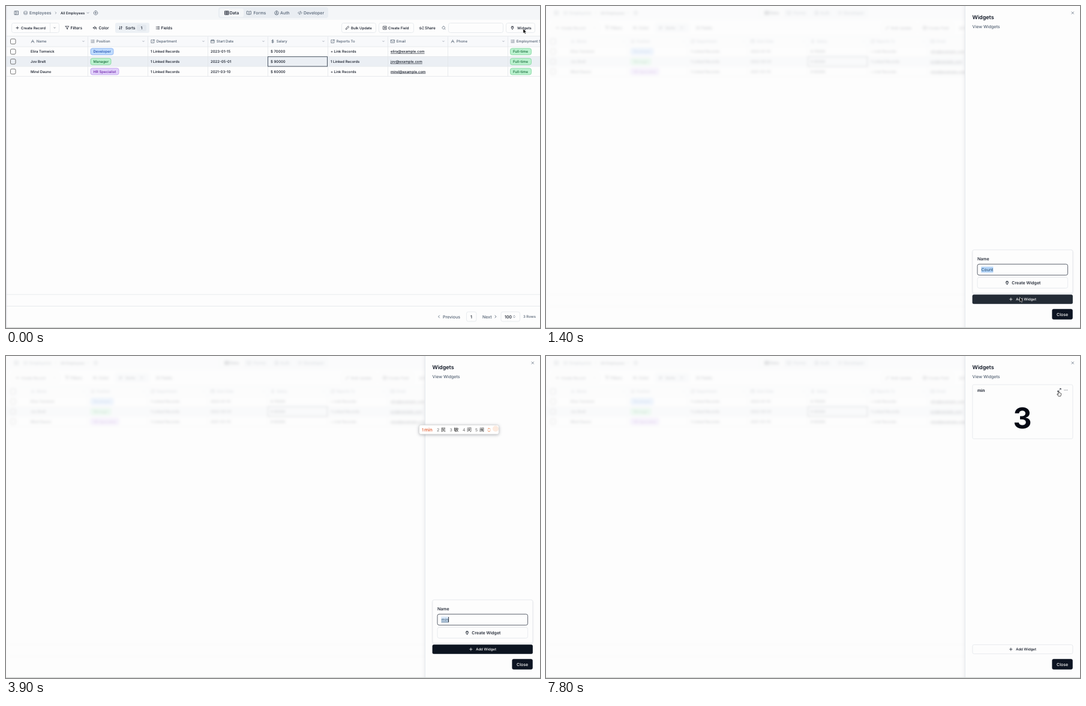
Recreate the animation shown at these times as an HTML page. Size 890 px wide and 538 px high, loop 8000 ms.

```html
<!DOCTYPE html>
<html lang="en">
<head>
<meta charset="utf-8">
<title>Widgets panel</title>
<style>
  html, body { margin: 0; width: 100%; height: 100%; overflow: hidden; background: #fdfdfd; }
  #stage { position: relative; width: 890px; height: 538px; overflow: hidden; }
  svg, #veil { position: absolute; left: 0; top: 0; width: 890px; height: 538px; }
  #veil { background: rgba(253, 253, 253, .8); backdrop-filter: blur(2px); }
  text { font-family: Inter, "Noto Sans CJK SC", "Noto Sans CJK", sans-serif; text-rendering: geometricPrecision; white-space: pre; }
  .icon { fill: none; stroke-linecap: round; stroke-linejoin: round; }
</style>
</head>
<body>
<div id="stage">
  <svg id="page" viewBox="0 0 890 538"></svg>
  <div id="veil"></div>
  <svg id="front" viewBox="0 0 890 538"></svg>
</div>
<script>
const LOOP = 8000, STEP = 100;
const INK = '#0d1422', SLATE = '#526072', LINE = '#e3e6ea', PAPER = '#fdfdfd';
const $ = id => document.getElementById(id);

function add(parent, tag, attrs = {}, content) {
  const el = document.createElementNS('http://www.w3.org/2000/svg', tag);
  for (const key in attrs) el.setAttribute(key, attrs[key]);
  if (content !== undefined) el.textContent = content;
  return parent.appendChild(el);
}
const group = (parent, attrs) => add(parent, 'g', attrs);
const box = (parent, x, y, width, height, fill, stroke = 'none', rx = 0, extra = {}) =>
  add(parent, 'rect', { x, y, width, height, fill, stroke, rx, 'stroke-width': .8, ...extra });
// y is the vertical centre of the text
const label = (parent, x, y, str, size = 6, fill = INK, weight = 500, extra = {}) =>
  add(parent, 'text', { x, y: y + size * .36, 'font-size': size, fill, 'font-weight': weight, ...extra }, str);
const line = (parent, x1, y1, x2, y2, stroke = LINE, w = .8) =>
  add(parent, 'line', { x1, y1, x2, y2, stroke, 'stroke-width': w });

// icon outlines in a 24 unit box
const ICONS = {
  plus: 'M5 12h14M12 5v14',
  down: 'M6 9l6 6 6-6',
  left: 'M15 18l-6-6 6-6',
  right: 'M9 18l6-6-6-6',
  updown: 'M7 15l5 5 5-5M7 9l5-5 5 5',
  close: 'M18 6L6 18M6 6l12 12',
  sidebar: 'M3 3h18v18H3zM9 3v18M16 9l-3 3 3 3',
  base: 'M3 5c0-3 18-3 18 0v14c0 3-18 3-18 0zM3 12c0 3 18 3 18 0',
  circlePlus: 'M12 2a10 10 0 1 0 .1 0M8 12h8M12 8v8',
  table: 'M3 3h18v18H3zM3 9h18M3 15h18M12 3v18',
  book: 'M2 4h7l3 3 3-3h7v15h-8l-2 2-2-2H2zM12 7v13',
  shield: 'M12 2a10 10 0 1 0 .1 0M12 7a3 3 0 1 0 .1 0M6 19c2-5 10-5 12 0',
  code: 'M17 17l5-5-5-5M7 7l-5 5 5 5M14 4l-4 16',
  filter: 'M2 3h20l-8 9v8l-4-2v-6z',
  paint: 'M4 11l8-8 8 8-8 8zM2 12h18M21 16v4',
  sort: 'M3 16l4 4 4-4M7 20V4M21 8l-4-4-4 4M17 4v16',
  list: 'M9 5h12M9 12h12M9 19h12M3 5h1M3 12h1M3 19h1',
  pen: 'M17 3l4 4L8 20l-5 1 1-5z',
  field: 'M3 3h18v18H3zM8 12h8M12 8v8',
  share: 'M9 12a5 5 0 1 0-1 4M2 21c0-7 14-7 14 0M17 4a4 4 0 0 1 0 8M19 15c2 1 3 3 3 6',
  search: 'M11 3a8 8 0 1 0 .1 0M21 21l-4-4',
  plug: 'M12 22v-5M9 8V2M15 8V2M18 8v5a4 4 0 0 1-4 4h-4a4 4 0 0 1-4-4V8z',
  letter: 'M4 20L12 4l8 16M7 14h10',
  select: 'M11 5h10M11 12h10M3 19h18M3 5h4M3 12h4',
  link: 'M14 3h7v7M21 3l-11 11M10 4H3v17h17v-7',
  date: 'M3 5h18v16H3zM3 10h18M8 2v5M16 2v5',
  money: 'M12 2v20M17 6H9a3 3 0 0 0 0 6h6a3 3 0 0 1 0 6H6',
  mail: 'M2 4h20v16H2zM2 7l10 7 10-7',
  expand: 'M15 3h6v6M9 21H3v-6M21 3l-7 7M3 21l7-7',
  dots: 'M4 12h1M12 12h1M20 12h1'
};
const icon = (parent, name, cx, cy, size = 7, stroke = INK) => add(parent, 'path', {
  d: ICONS[name], class: 'icon', stroke, 'stroke-width': 2.4,
  transform: `translate(${cx - size / 2} ${cy - size / 2}) scale(${size / 24})`
});

function drawPage(g) {
  box(g, 0, 0, 890, 538, PAPER);
  box(g, 0, 0, 890, 23, '#f4f6f8');
  icon(g, 'sidebar', 17.5, 11.5, 8, SLATE);
  icon(g, 'base', 32.5, 11.5, 7, SLATE);
  label(g, 39, 11.5, 'Employees', 7, SLATE);
  icon(g, 'right', 83, 11.5, 6, SLATE);
  label(g, 91, 11.5, 'All Employees');
  icon(g, 'down', 136.5, 11.5, 6, SLATE);
  icon(g, 'circlePlus', 149.5, 11.5, 8, SLATE);

  box(g, 354, 2, 183, 18, '#e9edf2', 'none', 4);
  box(g, 356, 4, 40, 14.5, '#f4f6f8', 'none', 3);
  [['table', 368, 'Data', 372.8, INK], ['book', 405, 'Forms', 412.5, SLATE],
   ['shield', 451, 'Auth', 457, SLATE], ['code', 490, 'Developer', 496, SLATE]]
    .forEach(([ic, ix, str, x, c]) => { icon(g, ic, ix, 11.5, 8, c); label(g, x, 11.5, str, 7, c); });

  box(g, 9.5, 28.5, 79, 16, PAPER, LINE, 3);
  line(g, 73.5, 28.5, 73.5, 44.5);
  icon(g, 'down', 81, 36.5, 5);
  box(g, 182, 28, 57, 17, '#edf1f5', 'none', 3);
  box(g, 218, 31, 16, 11, '#e4e9ef', 'none', 3);
  for (const [x, w] of [[559.5, 57], [621.5, 58], [737.5, 91], [833.5, 48]])
    box(g, x, 28.5, w, 16, PAPER, LINE, 3);
  [['plus', 19, 'Create Record', 25, 6], ['filter', 102, 'Filters', 107.5, 6.6], ['paint', 148, 'Color', 154.5, 6.6],
   ['sort', 191, 'Sorts', 199, 6.6], ['list', 253, 'Fields', 258.5, 6.6], ['pen', 569, 'Bulk Update', 575, 6],
   ['field', 631.5, 'Create Field', 637, 6], ['share', 693, 'Share', 698, 6.4], ['plug', 844, 'Widgets', 852, 6]]
    .forEach(([ic, ix, str, x, size]) => { icon(g, ic, ix, 36.5, 7); label(g, x, 36.5, str, size); });
  label(g, 224.5, 36.5, '1', 6.5);
  icon(g, 'search', 729.5, 36.5, 7, SLATE);

  box(g, 0, 50, 890, 18, '#f8f9fb');
  box(g, 0, 84.5, 890, 16.5, '#ebeff4');
  for (const y of [50.3, 68, 84.5, 101, 117.5, 482, 501.5]) line(g, 0, y, 890, y);
  const heads = [['letter', 'Name'], ['select', 'Position'], ['link', 'Department'], ['date', 'Start Date'], ['money', 'Salary'],
    ['link', 'Reports To'], ['mail', 'Email'], ['letter', 'Phone'], ['select', 'Employment Status']];
  heads.forEach(([ic, str], i) => {
    const x = 36 + i * 100;
    if (i) line(g, x + .5, 51, x + .5, 117.5);
    icon(g, ic, x + 8.5, 59, 7, SLATE);
    label(g, x + 14.7, 59, str, 6, SLATE);
    icon(g, 'down', x + 93, 59, 5, SLATE);
  });

  const BLUE = ['#bfdbfe', '#86aef0', '#1e4fae'], GREEN = ['#bbf2cf', '#7fd39c', '#17693a'], VIOLET = ['#e2d2fb', '#bd97ee', '#6b21a8'];
  const pill = (x, y, w, str, [fill, edge, ink]) => {
    box(g, x, y - 5.4, w, 10.8, fill, edge, 3);
    label(g, x + 4.5, y, str, 6, ink);
  };
  const rows = [
    ['Elira Tomwick', 'Developer', 38, BLUE, '2023-01-15', '$ 70000', '+ Link Records', 'elira@example.com'],
    ['Jov Brelt', 'Manager', 34, GREEN, '2022-05-01', '$ 90000', '1 Linked Records', 'jov@example.com'],
    ['Mirel Dauno', 'HR Specialist', 47, VIOLET, '2021-03-10', '$ 60000', '+ Link Records', 'mirel@example.com']
  ];
  box(g, 7.5, 55, 8.5, 8.5, PAPER, '#555', 2);
  rows.forEach(([name, role, w, tint, start, pay, boss, mail], i) => {
    const y = 76.2 + i * 16.6;
    box(g, 7.5, y - 4.2, 8.5, 8.5, 'none', '#555', 2);
    label(g, 41, y, name);
    pill(141, y, w, role, tint);
    label(g, 241, y, '1 Linked Records');
    label(g, 341, y, start);
    label(g, 441, y, pay);
    label(g, 541, y, boss);
    label(g, 641, y, mail, 6, INK, 500, { 'text-decoration': 'underline' });
    pill(840.5, y, 35, 'Full-time', GREEN);
  });
  box(g, 436.5, 84.7, 99, 16.2, 'none', '#4b5563', 0, { 'stroke-width': 1 });

  icon(g, 'left', 721.5, 519, 8, SLATE);
  label(g, 728, 519, 'Previous', 7, SLATE);
  box(g, 767.5, 511, 16.5, 16, PAPER, LINE, 3);
  label(g, 774, 519, '1', 7);
  label(g, 794, 519, 'Next', 7, SLATE);
  icon(g, 'right', 816, 519, 8, SLATE);
  box(g, 825, 511, 31.5, 16, PAPER, LINE, 3);
  label(g, 831, 519, '100', 7);
  icon(g, 'updown', 847, 519, 6, SLATE);
  label(g, 862, 519, '3 Rows', 6, SLATE);
  line(g, .8, 0, .8, 538, '#d5d8dd', 1);
}

const shade = (y, blur, a) => ({ style: `filter:drop-shadow(0 ${y}px ${blur}px rgba(15,23,42,${a}))` });
const front = $('front');
drawPage($('page'));

const panel = group(front);
box(panel, 698.5, -2, 194, 542, PAPER, '#e2e6eb', 0, shade(1, 3, .1));
label(panel, 710.5, 18.5, 'Widgets', 9, INK, 600);
label(panel, 710.5, 34.5, 'View Widgets', 7, SLATE);
icon(panel, 'close', 877.8, 11.5, 7, '#475569');
box(panel, 843.4, 506.3, 34.4, 17.4, INK, 'none', 3);
label(panel, 851, 515, 'Close', 7, '#fff');

box(panel, 710.9, 482.4, 167, 15.2, PAPER, LINE, 2.5);
const addDark = box(panel, 710.6, 482.3, 167.3, 15.4, '#0c1420', 'none', 2.5);
const addIcon = icon(panel, 'plus', 774.8, 490, 7.5);
const addText = label(panel, 783.2, 490, 'Add Widget');

const form = group(panel);
box(form, 710.9, 407.4, 167, 72.6, PAPER, LINE, 3, shade(1, 1.2, .1));
label(form, 719, 422, 'Name', 7);
box(form, 719, 431.3, 150.6, 18.4, PAPER, '#343c49', 3);
box(form, 719, 453.4, 150.6, 18, PAPER, LINE, 3);
icon(form, 'plug', 768.5, 462.5, 7.5);
label(form, 776.3, 462.5, 'Create Widget', 7);
const mark = box(form, 725.3, 435.6, 20, 9.8, '#b3d4f8');
const typed = label(form, 725.5, 440.5, '', 7, INK, 400);
const caret = box(form, 737, 436, .9, 9, INK);

const card = group(panel);
const frame = box(card, 710.9, 47.9, 167, 74.5, PAPER, LINE, 2);
label(card, 719, 57, 'min', 7, INK, 600);
const skeleton = group(card, { fill: '#dbe1ea' });
add(skeleton, 'circle', { cx: 782, cy: 94, r: 16 });
box(skeleton, 806.5, 80, 15.8, 8, '#dbe1ea', 'none', 2);
box(skeleton, 806.5, 100, 7.8, 8, '#dbe1ea', 'none', 2);
const total = add(card, 'text', { x: 794, y: 120.9, 'font-size': 48, 'font-weight': 700, 'text-anchor': 'middle', fill: '#050914' }, '3');
const tools = group(card);
icon(tools, 'expand', 855.5, 57, 7);
icon(tools, 'dots', 866.3, 57, 7);

line(front, 0, 537.3, 890, 537.3, '#cfd3d1', 1.3);

const ime = group(front);
box(ime, 688.5, 115.3, 133, 15.4, '#fff', '#d9d9d9', 3, shade(1, 2.5, .3));
label(ime, 693, 123, '1', 7, '#e2592b', 500);
const candidates = [697, 725, 746.5, 768, 789].map((x, i) => {
  if (i) label(ime, x - 7, 123, String(i + 1), 7, '#666', 400);
  return label(ime, x, 123, '', 8, i ? '#222' : '#e2592b');
});
icon(ime, 'updown', 805, 123.5, 9, '#e8702f');
add(ime, 'circle', { cx: 816, cy: 121.5, r: 5, fill: '#fdebdf' });

const arrow = add(front, 'path', {
  d: 'M0 0V7.6L1.8 6.1 3 8.7 4.3 8.1 3.1 5.6H5.4Z', fill: '#000', stroke: '#fff', 'stroke-width': .5
});
const hand = add(front, 'path', {
  d: 'M3 0.8Q4 .1 4.5 1V3.8Q5.3 3.3 5.9 4Q6.8 3.7 7.2 4.5Q8.3 4.3 8.4 5.4V7.5L7.4 10.4H3.2L.6 6.8Q.6 5.7 1.7 6L3 7Z',
  fill: '#fff', stroke: '#000', 'stroke-width': .8, 'stroke-linejoin': 'round', transform: 'translate(851.3 58.2) scale(.86)'
});

// time, x, y of the pointer tip
const PATH = [[0, 862, 38], [200, 862, 38], [700, 814, 413], [1000, 791, 487], [1800, 788, 486], [2100, 786.8, 452], [2400, 786.8, 452],
  [4300, 787, 456], [4600, 796, 509], [4800, 789, 488], [5300, 788, 487], [5700, 788, 486], [5800, 787, 477],
  [6000, 790, 461], [6400, 790, 460], [6700, 797.5, 204], [7300, 854, 60], [7500, 855, 58]];
// time, field text, input candidates
const TYPING = [[0, 'Count'], [3400, 'm', 'm 没 吗 们 每'], [3600, 'mi', 'mi 米 密 迷 蜜'], [3800, 'min', 'min 民 敏 闵 闽'], [4100, 'min']];

const clamp = v => Math.max(0, Math.min(1, v));
const ramp = (t, from, length) => clamp((t - from) / length);
const smooth = p => p * p * (3 - 2 * p);
const between = (t, a, b) => t >= a && t < b;
const show = (el, on) => { el.style.display = on ? '' : 'none'; };

function pointer(t) {
  const i = PATH.findIndex(p => p[0] > t);
  if (i < 0) return PATH[PATH.length - 1].slice(1);
  const [t0, x0, y0] = PATH[i - 1], [t1, x1, y1] = PATH[i];
  const p = smooth((t - t0) / (t1 - t0));
  return [x0 + (x1 - x0) * p, y0 + (y1 - y0) * p];
}

function render(t) {
  $('veil').style.opacity = ramp(t, 200, 150);
  panel.setAttribute('transform', `translate(${200 * (1 - smooth(ramp(t, 220, 500)))} 0)`);
  show(panel, t > 220);

  const hover = between(t, 1000, 1900) || between(t, 5800, 5900);
  const dark = (hover ? .9 : 1) * (1 - ramp(t, 6580, 150));
  addDark.setAttribute('opacity', dark);
  addText.setAttribute('fill', dark > .5 ? '#fff' : INK);
  addIcon.setAttribute('stroke', dark > .5 ? '#fff' : INK);

  show(form, between(t, 1400, 6600));
  const [, value, options] = TYPING.filter(s => s[0] <= t).pop();
  const selected = value === 'Count';
  typed.textContent = value;
  typed.setAttribute('text-decoration', options ? 'underline' : 'none');
  typed.setAttribute('fill', selected || options ? '#1d4468' : INK);
  show(mark, selected || options);
  mark.setAttribute('fill', selected ? '#b3d4f8' : '#d9e8f8');
  const width = selected ? 20 : { m: 6, mi: 8, min: 12 }[value];
  mark.setAttribute('width', width);
  caret.setAttribute('x', 725.2 + width);
  show(caret, !selected && (options || (t - 4100) % 1000 < 500) && t < 6200);
  show(ime, options);
  if (options) options.split(' ').forEach((word, i) => { candidates[i].textContent = word; });

  const loaded = t >= 7000;
  show(card, t >= 6700);
  show(skeleton, !loaded);
  show(total, loaded);
  frame.setAttribute('height', loaded ? 90.4 : 74.5);
  show(tools, loaded);

  const [x, y] = pointer(t);
  arrow.setAttribute('transform', `translate(${x} ${y})`);
  show(arrow, t < 7800 && !between(t, 3400, 4400));
  show(hand, t >= 7800);
}

const begin = performance.now();
function tick() {
  const t = (performance.now() - begin) % LOOP;
  render(Math.floor(t / STEP) * STEP);
  requestAnimationFrame(tick);
}
tick();
</script>
</body>
</html>
```
